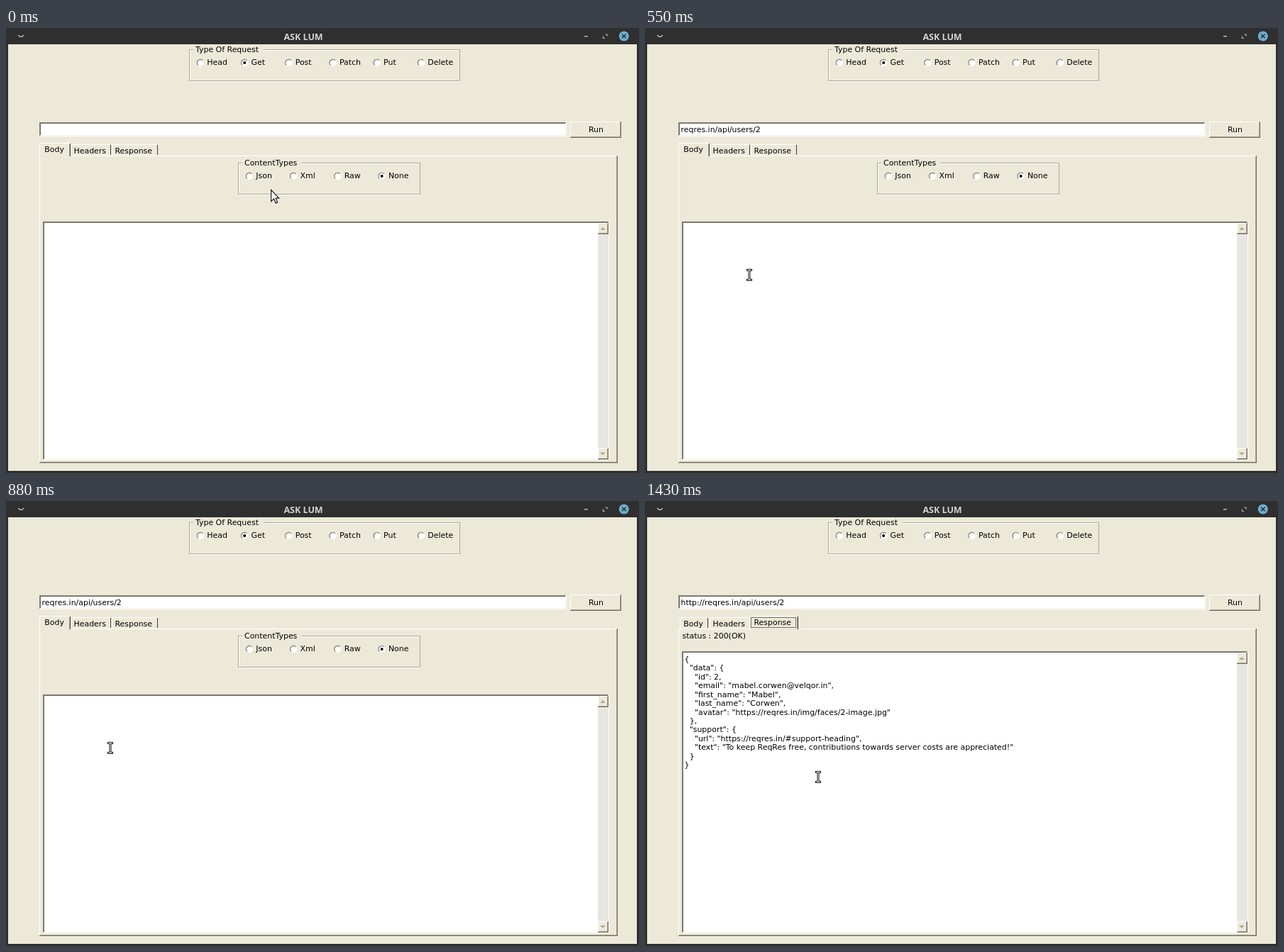
An HTML page with a canvas for the animation above (1650 ms loop, 892x628 px).

```html
<!DOCTYPE html>
<html lang="en">
<head>
<meta charset="utf-8">
<title>Request tool</title>
<style>
  html, body { margin: 0; width: 100%; height: 100%; overflow: hidden; background: #2f2f2f; }
  canvas { display: block; }
</style>
</head>
<body>
<canvas id="stage" width="892" height="628"></canvas>
<script>
const ctx = document.getElementById('stage').getContext('2d');
const FACE = '#ece9d8', DARK = '#716f64', SHADE = '#aca899', LIGHT = '#ffffff', BAR = '#2f2f2f';
const STEP = 550;
const RADIO_GAP = 62.2;

const response = [
  '{',
  '  "data": {',
  '    "id": 2,',
  '    "email": "mabel.corwen@velqor.in",',
  '    "first_name": "Mabel",',
  '    "last_name": "Corwen",',
  '    "avatar": "https://reqres.in/img/faces/2-image.jpg"',
  '  },',
  '  "support": {',
  '    "url": "https://reqres.in/#support-heading",',
  '    "text": "To keep ReqRes free, contributions towards server costs are appreciated!"',
  '  }',
  '}'
];

const scenes = [
  { url: '', tab: 0, pointer: () => arrow(373, 228) },
  { url: 'reqres.in/api/users/2', tab: 0, pointer: () => beam(147, 348) },
  { url: 'http://reqres.in/api/users/2', tab: 2, pointer: () => beam(244, 389) }
];

const tabs = [
  { name: 'Body', x: 54.3, left: 49, right: 89 },
  { name: 'Headers', x: 95.5, left: 91, right: 148 },
  { name: 'Response', x: 153.5, left: 149, right: 214 }
];

function rect(x, y, w, h, color) {
  ctx.fillStyle = color;
  ctx.fillRect(x, y, w, h);
}

function text(str, x, y, color = '#000', align = 'left', font = '10.95px "DejaVu Sans", sans-serif') {
  ctx.font = font;
  ctx.textAlign = align;
  ctx.fillStyle = color;
  ctx.fillText(str, x, y);
}

function polyline(points, color, width) {
  ctx.beginPath();
  points.forEach(([x, y]) => ctx.lineTo(x, y));
  ctx.strokeStyle = color;
  ctx.lineWidth = width;
  ctx.stroke();
}

function bevel(x, y, w, h, topLeft, bottomRight) {
  rect(x, y, w, 1, topLeft);
  rect(x, y, 1, h, topLeft);
  rect(x, y + h - 1, w, 1, bottomRight);
  rect(x + w - 1, y, 1, h, bottomRight);
}

function sunken(x, y, w, h) {
  rect(x, y, w, h, LIGHT);
  bevel(x, y, w, h, '#858377', LIGHT);
  bevel(x + 1, y + 1, w - 2, h - 2, DARK, '#f1efe2');
}

function raised(x, y, w, h) {
  rect(x, y, w, h, FACE);
  bevel(x, y, w, h, LIGHT, DARK);
  rect(x + 1, y + h - 2, w - 2, 1, SHADE);
  rect(x + w - 2, y + 1, 1, h - 2, SHADE);
}

function radio(x, y, on) {
  ctx.beginPath();
  ctx.arc(x, y, 5, 0, 7);
  ctx.fillStyle = LIGHT;
  ctx.fill();
  ctx.beginPath();
  ctx.arc(x, y, 4.7, Math.PI * 0.75, Math.PI * 1.75);
  ctx.strokeStyle = '#7c7a6f';
  ctx.lineWidth = 1.3;
  ctx.stroke();
  if (!on) return;
  ctx.beginPath();
  ctx.arc(x, y, 2, 0, 7);
  ctx.fillStyle = '#000';
  ctx.fill();
}

function group(x, y, w, title, titleX, gapEnd, names, chosen) {
  const h = 45;
  bevel(x + 1, y + 1, w - 1, h, LIGHT, LIGHT);
  bevel(x, y, w, h, SHADE, SHADE);
  rect(titleX - 4, y - 2, gapEnd - titleX + 4, 6, FACE);
  text(title, titleX - 1, y + 4);
  names.forEach((name, i) => {
    const left = x + 16 + i * RADIO_GAP;
    radio(left, y + 19, name === chosen);
    text(name, left + 9.3, y + 22);
  });
}

function drawTab(tab, active) {
  const x = active ? tab.left - 2 : tab.left;
  const right = active ? tab.right + 2 : tab.right;
  const top = active ? 162 : 164;
  const bottom = active ? 182 : 180;
  rect(x, top, right - x, bottom - top, FACE);
  rect(x + 1, top, right - x - 2, 1, LIGHT);
  rect(x, top + 1, 1, bottom - top - 1, LIGHT);
  rect(right - 1, top + 1, 1, bottom - top - 2, '#3f3e38');
  if (active) rect(right - 2, top + 2, 1, bottom - top - 3, SHADE);
  text(tab.name, tab.x, active ? 175 : 177);
}

function scrollButton(y, dir) {
  raised(834, y, 15, 16);
  ctx.beginPath();
  ctx.moveTo(837.5, y + 8 + 2 * dir);
  ctx.lineTo(844.5, y + 8 + 2 * dir);
  ctx.lineTo(841, y + 8 - 2 * dir);
  ctx.fillStyle = SHADE;
  ctx.fill();
}

function textArea(top) {
  sunken(52, top, 798, 610 - top);
  rect(834, top + 2, 15, 606 - top, '#e7e6e2');
  scrollButton(top + 2, 1);
  scrollButton(593, -1);
}

function arrow(x, y) {
  ctx.beginPath();
  [[0, 0], [0, 16], [4, 12.5], [6.5, 18.5], [9, 17.5], [6.5, 11.5], [11, 11.5]]
    .forEach(([dx, dy]) => ctx.lineTo(x + 0.6 + dx, y + 0.6 + dy));
  ctx.closePath();
  ctx.fillStyle = LIGHT;
  ctx.fill();
  ctx.strokeStyle = '#1c1c24';
  ctx.lineWidth = 1.2;
  ctx.stroke();
}

function beam(x, y) {
  for (const [grow, color] of [[1, '#111'], [0, LIGHT]]) {
    rect(x - 3 - grow, y - 7 - grow, 6 + 2 * grow, 1 + 2 * grow, color);
    rect(x - 3 - grow, y + 7 - grow, 6 + 2 * grow, 1 + 2 * grow, color);
    rect(x - 0.5 - grow, y - 7, 1 + 2 * grow, 15, color);
  }
}

function titleBar() {
  const gray = '#b8b8b8';
  text('ASK LUM', 419, 17, '#d3d3d3', 'center', '600 12.5px "Noto Sans", sans-serif');
  polyline([[17, 10], [19.5, 12.2], [22.5, 12.2], [25, 10]], gray, 1.5);
  rect(815, 11, 5, 1.5, gray);
  polyline([[844.5, 9], [847, 9], [847, 11.5]], gray, 1.2);
  polyline([[841.5, 11.5], [841.5, 14.5], [844, 14.5]], gray, 1.2);
  ctx.beginPath();
  ctx.arc(870.8, 11.5, 7, 0, 7);
  ctx.fillStyle = '#6cafd0';
  ctx.fill();
  polyline([[868, 8.7], [873.6, 14.3]], BAR, 1.5);
  polyline([[873.6, 8.7], [868, 14.3]], BAR, 1.5);
}

function draw(scene) {
  rect(0, 0, 892, 628, BAR);
  rect(3, 23, 886, 602, FACE);
  titleBar();

  group(258, 30, 382, 'Type Of Request', 268, 363,
    ['Head', 'Get', 'Post', 'Patch', 'Put', 'Delete'], 'Get');

  sunken(47, 133, 743, 20);
  text(scene.url, 50.5, 147);
  raised(795, 132, 72, 23);
  text('Run', 831.5, 147, '#000', 'center');

  bevel(47, 180, 815, 434, LIGHT, DARK);
  rect(48, 612, 813, 1, SHADE);
  rect(860, 181, 1, 432, SHADE);
  tabs.forEach((tab, i) => { if (i !== scene.tab) drawTab(tab, false); });
  drawTab(tabs[scene.tab], true);

  if (scene.tab === 0) {
    group(327, 190, 257, 'ContentTypes', 337, 416, ['Json', 'Xml', 'Raw', 'None'], 'None');
    textArea(273);
  } else {
    ctx.setLineDash([1, 1]);
    ctx.strokeStyle = '#000';
    ctx.lineWidth = 1;
    ctx.strokeRect(149.5, 164.5, 63, 14);
    ctx.setLineDash([]);
    text('status : 200(OK)', 52.5, 194);
    textArea(212);
    response.forEach((line, i) => {
      const indent = line.length - line.trimStart().length;
      text(line.trimStart(), 55.5 + indent * 3.6, 227 + i * 12.42);
    });
  }
  scene.pointer();
}

function tick(now) {
  draw(scenes[Math.floor(now / STEP) % scenes.length]);
  requestAnimationFrame(tick);
}
requestAnimationFrame(tick);
</script>
</body>
</html>
```
